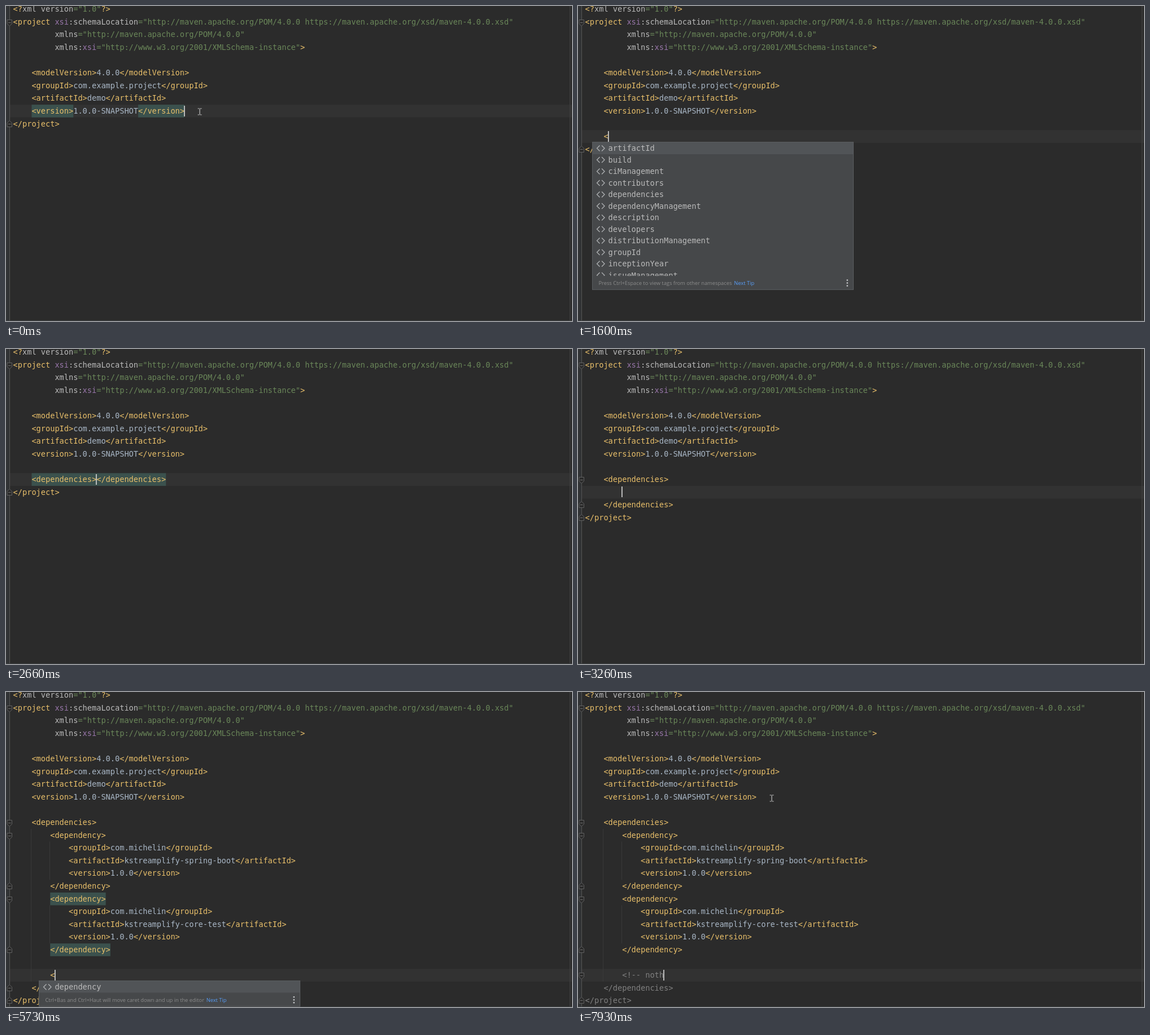
An HTML page with a canvas that plays this animation: 1002x559 px, repeating every 8 s.

```html
<!DOCTYPE html>
<html lang="en">
<head>
<meta charset="utf-8">
<title>Editor</title>
<style>
html, body { margin: 0; width: 100%; height: 100%; overflow: hidden; background: #2b2b2b; }
canvas { display: block; }
</style>
</head>
<body>
<canvas id="stage" width="1002" height="559"></canvas>
<script>
const ctx = document.getElementById('stage').getContext('2d');
const W = 1002, H = 559, LOOP = 8000;
const LEFT = 12.6, CHAR = 8.2, ROW = 22.59;
const MONO = '13.62px "DejaVu Sans Mono", monospace';
const UI = '9.3px "Open Sans", sans-serif';
const C = {
  bg: '#2b2b2b', gutter: '#313335', line: '#323232', rule: '#555555', guide: '#393939',
  tag: '#e8bf6a', text: '#a9b7c6', attr: '#bababa', prefix: '#9876aa', value: '#6a8759',
  comment: '#808080', match: '#3b514d', word: '#344134', caret: '#d0d0d0',
  popup: '#46484a', border: '#5a5d5f', picked: '#515457', item: '#bbbbbb', hit: '#589df6',
  hint: '#8c8c8c', bulb: '#f2a732'
};

const HEAD = [
  '<?xml version="1.0"?>',
  '<project xsi:schemaLocation="http://maven.apache.org/POM/4.0.0 https://maven.apache.org/xsd/maven-4.0.0.xsd"',
  '         xmlns="http://maven.apache.org/POM/4.0.0"',
  '         xmlns:xsi="http://www.w3.org/2001/XMLSchema-instance">',
  '',
  '    <modelVersion>4.0.0</modelVersion>',
  '    <groupId>com.example.project</groupId>',
  '    <artifactId>demo</artifactId>',
  '    <version>1.0.0-SNAPSHOT</version>'
];
const END = '</project>', OPEN = '    <dependencies>', CLOSE = '    </dependencies>';
const dependency = name => [
  '        <dependency>',
  '            <groupId>com.michelin</groupId>',
  `            <artifactId>${name}</artifactId>`,
  '            <version>1.0.0</version>',
  '        </dependency>'
];
const typed = text => ['', '    ' + text, END];
const filled = (...extra) => ['', OPEN, ...dependency('kstreamplify-spring-boot'),
  ...dependency('kstreamplify-core-test'), ...extra, CLOSE, END];
const note = text => ({ body: filled('', '        ' + text), caret: [22, 8 + text.length] });

const popup = (items, query, hint) => ({ items: items.split(' '), query, hint });
const NAMESPACES = 'Press Ctrl+Espace to view tags from other namespaces';
const D_TAGS = 'dependencies dependencyManagement description developers';

// Each entry changes part of the editor state from its time onward.
const TIMELINE = [
  [0, { body: [END], caret: [8, 37], tags: [[8, 4, 13], [8, 27, 37]], mouse: 187.5 }],
  [70, { body: ['', END], caret: [9, 4], mouse: 0 }],
  [270, { body: ['', '', END], caret: [10, 4] }],
  [600, { tags: [] }],
  [1460, { body: typed('<'), caret: [10, 5] }],
  [1600, { popup: popup('artifactId build ciManagement contributors ' + D_TAGS +
    ' distributionManagement groupId inceptionYear issueManagement', '', NAMESPACES) }],
  [2000, { body: typed('<d'), caret: [10, 6], word: [10, 5, 6], popup: popup(D_TAGS +
    ' distributionManagement artifactId build groupId modelVersion modules', 'd', NAMESPACES) }],
  [2200, { body: typed('<de'), caret: [10, 7], word: [10, 5, 7],
    popup: popup(D_TAGS + ' modelVersion', 'de', NAMESPACES) }],
  [2330, { body: typed('<dependencies'), caret: [10, 17], word: null, popup: null }],
  [2660, { body: typed('<dependencies></dependencies>'), caret: [10, 18],
    tags: [[10, 4, 18], [10, 18, 33]] }],
  [2930, { body: ['', OPEN, '', CLOSE, END], caret: [11, 8], tags: [[10, 4, 18], [12, 4, 19]] }],
  [3260, { tags: [], folds: true }],
  [3740, { bulb: 227 }],
  [4010, { blink: true }],
  [4280, { body: filled(), caret: [20, 21], blink: false, bulb: 0, tags: [[20, 20, 21]] }],
  [4540, { tags: [[16, 8, 20], [20, 8, 21]] }],
  [5070, { bulb: 446 }],
  [5270, { body: filled(''), caret: [21, 8], bulb: 0 }],
  [5470, note('')],
  [5730, { ...note('<'),
    popup: popup('dependency', '', 'Ctrl+Bas and Ctrl+Haut will move caret down and up in the editor') }],
  [6200, { ...note('<!'), popup: null }],
  [6520, { ...note('<!-'), tags: [] }],
  [6790, note('<!--')],
  [7060, note('<!-- ')],
  [7190, { commentFold: true }],
  [7460, note('<!-- n')],
  [7600, note('<!-- no')],
  [7730, note('<!-- not')],
  [7930, { ...note('<!-- noth'), mouse: 188.5 }]
];

const stateAt = t => Object.assign({}, ...TIMELINE.filter(([at]) => at <= t).map(([, s]) => s));
const colX = col => LEFT + col * CHAR;
const rowY = row => row * ROW - 5.6;

function rect(color, x, y, w, h) {
  ctx.fillStyle = color;
  ctx.fillRect(x, y, w, h);
}

function stroke(color, width, points, close) {
  ctx.strokeStyle = color;
  ctx.lineWidth = width;
  ctx.beginPath();
  points.forEach(([x, y]) => ctx.lineTo(x, y));
  if (close) ctx.closePath();
  ctx.stroke();
}

function mono(text, x, y, color) {
  ctx.font = MONO;
  ctx.fillStyle = color;
  [...text].forEach((ch, i) => ctx.fillText(ch, x + i * CHAR, y));
}

function label(text, x, y, color) {
  ctx.font = UI;
  ctx.fillStyle = color;
  ctx.fillText(text, x, y);
  return ctx.measureText(text).width;
}

function tokenColor(token, row) {
  if (token.startsWith('="')) return C.value;
  if (/^[<>]|\?>/.test(token)) return C.tag;
  if (token === 'xsi') return C.prefix;
  return row < 4 ? C.attr : C.text;
}

function drawCode(lines) {
  let comment = false;
  lines.forEach((line, row) => {
    comment = comment || line.includes('<!--');
    const y = Math.round(rowY(row) + 15.8);
    for (const m of line.matchAll(/="[^"]*"|<\?|\?>|<\/?\w*|>|xsi|\S/g)) {
      mono(m[0], colX(m.index), y, comment ? C.comment : tokenColor(m[0], row));
    }
  });
}

function drawFold(row, dir) {
  const y = Math.round(rowY(row) + 11.8) + (dir < 0 ? -0.5 : 0.5);
  const shape = [[2, -5], [10.5, -5], [10.5, 2], [6.25, 6], [2, 2]].map(([x, dy]) => [x, y + dy * dir]);
  ctx.fillStyle = C.bg;
  ctx.beginPath();
  shape.forEach(([x, py]) => ctx.lineTo(x, py));
  ctx.fill();
  stroke('#606060', 1, shape, true);
  stroke('#707070', 1, [[4, y], [8.5, y]]);
}

function drawFolds(lines, s) {
  lines.forEach((line, row) => {
    const text = line.trim();
    if (s.commentFold && text === '</dependencies>') return;
    if (/^<project /.test(text) || (s.folds && /^<dependenc\w+>$/.test(text)) ||
        (s.commentFold && text.startsWith('<!--'))) drawFold(row, 1);
    if (text === END || (s.folds && /^<\/dependenc/.test(text))) drawFold(row, -1);
  });
}

function drawGuides(lines) {
  const last = lines.indexOf(CLOSE);
  if (last < 20) return;
  [[44, 11, last], [77, 12, 15], [77, 17, 20]].forEach(([x, from, to]) =>
    rect(C.guide, x, rowY(from), 1, (to - from) * ROW));
}

function drawBulb(y) {
  ctx.fillStyle = C.bulb;
  ctx.beginPath();
  ctx.arc(27, y + 6, 5.3, 0, 7);
  ctx.fill();
  rect(C.bulb, 24.5, y + 9, 5, 2.5);
  rect('#9da0a2', 24.5, y + 12, 5, 1);
  rect('#9da0a2', 25, y + 14, 4, 1);
}

function drawMouse(y) {
  const x = 343;
  rect('#c4c4c4', x - 0.6, y - 5, 1.2, 10);
  for (const edge of [y - 6, y + 5]) {
    rect('#c4c4c4', x - 3.5, edge, 3, 1);
    rect('#c4c4c4', x + 0.5, edge, 3, 1);
  }
}

function drawPopup({ items, query, hint }, row, col) {
  const pitch = 20.5, width = 463;
  const textX = colX(col), x = Math.round(textX - 28.6), y = Math.round(rowY(row) + 20.9);
  const listH = Math.min(items.length, 11.55) * pitch, height = listH + 26;
  rect(C.popup, x, y, width, height);
  ctx.save();
  ctx.beginPath();
  ctx.rect(x, y, width, listH + 1);
  ctx.clip();
  rect(C.picked, x + 1, y + 1, width - 2, 21);
  items.forEach((item, i) => {
    const mid = y + 11.5 + i * pitch, base = Math.round(mid + 4.7);
    const at = item.toLowerCase().indexOf(query);
    stroke('#afb1b3', 1.3, [[x + 13.5, mid - 5], [x + 8.5, mid], [x + 13.5, mid + 5]]);
    stroke('#afb1b3', 1.3, [[x + 17, mid - 5], [x + 22, mid], [x + 17, mid + 5]]);
    mono(item.slice(0, at), textX, base, C.item);
    mono(item.slice(at, at + query.length), textX + at * CHAR, base, C.hit);
    mono(item.slice(at + query.length), textX + (at + query.length) * CHAR, base, C.item);
  });
  ctx.restore();
  const footer = y + listH + 14;
  const used = label(hint, x + 11.5, footer + 3, C.hint);
  label('Next Tip', x + 15.5 + used, footer + 3, C.hit);
  for (const dy of [-5, 0, 5]) rect('#bcbec0', x + 450.5, footer + dy - 1.5, 2.5, 2.5);
  ctx.strokeStyle = C.border;
  ctx.lineWidth = 1;
  ctx.strokeRect(x + 0.5, y + 0.5, width - 1, height - 1);
}

function draw(t) {
  const s = stateAt(t), lines = [...HEAD, ...s.body], [row, col] = s.caret;
  const mark = color => ([r, from, to]) => rect(color, colX(from), rowY(r), (to - from) * CHAR, ROW);
  rect(C.bg, 0, 0, W, H);
  rect(C.gutter, 0, 0, 6, H);
  rect(C.line, 7, rowY(row), W - 7, ROW);
  rect(C.rule, 6, 0, 1, H);
  rect('#424242', 998, 0, 1, H);
  rect('#3c3f41', 0, 558, W, 1);
  drawGuides(lines);
  s.tags.forEach(mark(C.match));
  if (s.word) mark(C.word)(s.word);
  drawCode(lines);
  drawFolds(lines, s);
  if (!s.blink) rect(C.caret, Math.round(colX(col) - 0.8), Math.round(rowY(row) + 1.5), 1.7, 19);
  if (s.bulb) drawBulb(s.bulb);
  if (s.popup) drawPopup(s.popup, row, row === 10 ? 5 : 9);
  if (s.mouse) drawMouse(s.mouse);
}

const start = performance.now();
function tick() {
  draw((performance.now() - start) % LOOP);
  requestAnimationFrame(tick);
}
tick();
</script>
</body>
</html>
```
